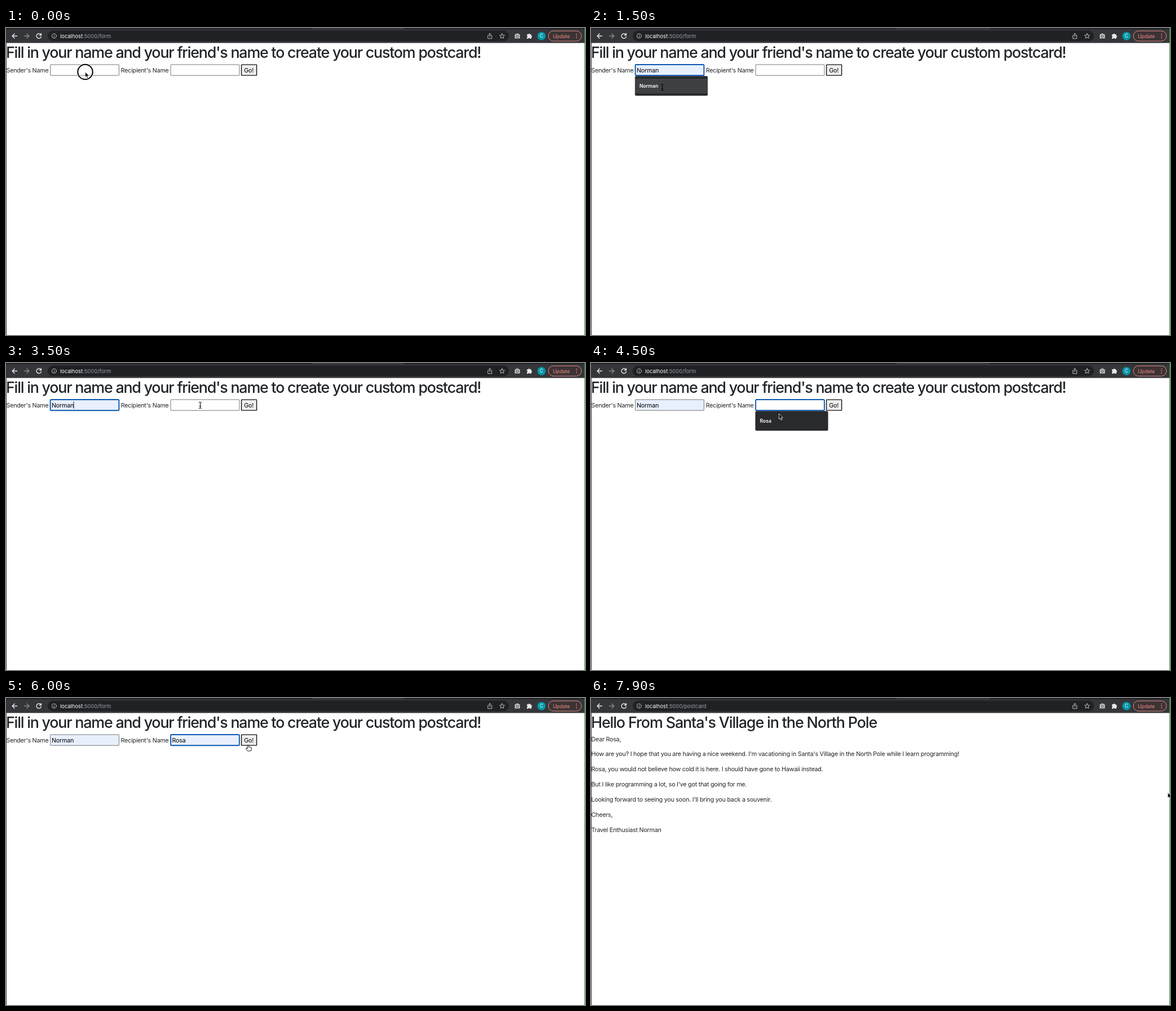
These frames come from a looping animation (1027x545 px, 8000 ms). An HTML page:

```html
<!DOCTYPE html>
<html lang="en">
<head>
<meta charset="utf-8">
<title>Postcard form</title>
<style>
  html, body { margin: 0; width: 100%; height: 100%; overflow: hidden; background: #fff; }
  svg { display: block; width: 1027px; height: 545px; }
  text { font-family: Inter, Roboto, sans-serif; font-optical-sizing: none; white-space: pre; }
  .body text { font-size: 10.75px; letter-spacing: -.25px; fill: #212529; }
  .body .title { font-size: 26.9px; font-weight: 500; letter-spacing: -1.24px; }
  .body .greeting { letter-spacing: -1.13px; }
  .body .value { fill: #000; }
  .body .option { font-size: 8.6px; font-weight: 600; letter-spacing: 0; fill: #fff; }
  .url { font-size: 9.4px; fill: #9aa0a6; }
  .url .host { fill: #fff; }
  .line { fill: none; stroke-linecap: round; stroke-linejoin: round; }
</style>
</head>
<body>
<svg viewBox="0 0 1027 545">
  <rect width="1027" height="545" fill="#fff"/>

  <g class="body" id="form">
    <text class="title" x="0" y="53">Fill in your name and your friend's name to create your custom postcard!</text>
    <text x=".5" y="78.6">Sender's Name</text>
    <text x="203.8" y="78.6">Recipient's Name</text>
    <rect id="button" x="417.6" y="65.1" width="27" height="19" fill="#efefef"/>
    <text class="value" x="422.3" y="78.6">Go!</text>
    <g id="fields"></g>
  </g>

  <g class="body" id="letter">
    <text class="title greeting" x="0" y="53">Hello From Santa's Village in the North Pole</text>
  </g>

  <g id="toolbar">
    <rect width="1027" height="26.6" fill="#35363a"/>
    <rect width="1027" height="2" fill="#202124"/>
    <rect x="542" width="165" height="2" fill="#35363a"/>
    <rect x="74" y="4.6" width="818" height="19" rx="9.5" fill="#202124"/>
    <g class="line" stroke="#e8eaed" stroke-width="1.4">
      <path d="M19.5 14.2h-8.4m4-4-4 4 4 4"/>
      <path d="M32.5 14.2h8.4m-4-4 4 4-4 4" stroke="#85878b"/>
      <path id="reload" d="M61.6 11.5A4.2 4.2 0 1 0 62.4 15.4M62.4 9.8v2.9h-2.9"/>
      <path id="stop" d="m55 10.8 6.8 6.8m0-6.8-6.8 6.8"/>
    </g>
    <g class="line" stroke="#bdc1c6" stroke-width="1">
      <circle cx="85.4" cy="14.2" r="4"/>
      <path d="M85.4 13.8v2.4m0-4.2v.1"/>
      <path d="M856.3 13.2h-1.6v5.6h7v-5.6h-1.6m-1.9 2.3V9.6m-1.9 1.9 1.9-1.9 1.9 1.9"/>
      <path d="m880 9.8 1.3 2.9 3.1.3-2.3 2.1.7 3.1-2.8-1.6-2.8 1.6.7-3.1-2.3-2.1 3.1-.3z"/>
    </g>
    <text class="url" x="96" y="17.6"><tspan class="host">localhost</tspan><tspan id="path"></tspan></text>
    <path d="M902.5 11.2h2l1-1.5h3l1 1.5h2v7.4h-9z" fill="#c9cbce"/>
    <circle cx="907" cy="14.7" r="2.1" fill="#c9cbce" stroke="#35363a" stroke-width="1"/>
    <path d="M924 11.3h2.5a1.4 1.4 0 1 1 2.8 0h2.4v2.4a1.4 1.4 0 1 1 0 2.8v2.4h-2.5a1.4 1.4 0 0 0-2.7 0H924v-2.5a1.4 1.4 0 0 0 0-2.7z" fill="#e8eaed"/>
    <circle cx="949.8" cy="14.3" r="7.4" fill="#0097a7"/>
    <text x="949.8" y="17.3" font-size="8.4" text-anchor="middle" fill="#fff">C</text>
    <rect x="962" y="5.2" width="58.6" height="18" rx="9" fill="#3c3335" stroke="#e58a83"/>
    <text x="970" y="17.5" font-size="8.8" fill="#f28b82">Update</text>
    <path class="line" d="M1012 10.7v.01m0 3.5v.01m0 3.5v.01" stroke="#f28b82" stroke-width="1.7"/>
  </g>

  <rect y="26.6" width="1" height="519" fill="#3a3a3c"/>
  <rect x="1026" width="1" height="545" fill="#2f9e38"/>

  <g id="pointer">
    <g class="line" id="ring">
      <circle stroke="#fff" stroke-width="4"/>
      <circle stroke="#000" stroke-width="2"/>
    </g>
    <path id="arrow" d="M0 0v9.6l2.2-2 1.6 3.7 1.7-.8-1.6-3.5h3z" fill="#000" stroke="#fff" stroke-width=".8"/>
    <path id="beam" class="line" d="M-2.2-5.7Q0-5.7 0-4.2V4.2Q0 5.7-2.2 5.7M2.2-5.7Q0-5.7 0-4.2V4.2Q0 5.7 2.2 5.7M-1.2 1.8h2.4" stroke="#000"/>
    <path id="hand" d="M-1 .7Q0-.7 1 .7v3.5q1-.8 1.8.2 1-.7 1.7.3 1.3-.5 1.5.8v2.4L4.8 11H-1L-3.7 7.3q-.5-1.8.8-1.6l1.9 1.2z" fill="#fff" stroke="#000" stroke-width=".9" stroke-linejoin="round"/>
  </g>
</svg>
<script>
const DURATION = 8000, STEP = 100, BLUE = '#0b57b0';
const el = id => document.getElementById(id);
const show = (node, on) => { node.style.display = on ? '' : 'none'; };
const within = (t, spans) => spans.some(([from, to]) => t >= from && t < to);

const paragraphs = [
  'Dear Rosa,',
  "How are you? I hope that you are having a nice weekend. I'm vacationing in Santa's Village in the North Pole while I learn programming!",
  'Rosa, you would not believe how cold it is here. I should have gone to Hawaii instead.',
  "But I like programming a lot, so I've got that going for me.",
  "Looking forward to seeing you soon. I'll bring you back a souvenir.",
  'Cheers,',
  'Travel Enthusiast Norman'
];
el('letter').insertAdjacentHTML('beforeend', paragraphs.map((line, i) =>
  `<text x=".5" y="${76.6 + 26.85 * i}">${line}</text>`).join(''));

// Times in ms: menu opens, option is hovered, value is filled, focus is lost.
const fields = [
  { x: 78, name: 'Norman', open: 800, hover: 1500, fill: 2300, blur: 3900,
    blinks: [[800, 1300], [1700, 1900], [2300, 2700], [3200, 3900]] },
  { x: 291.5, name: 'Rosa', open: 3900, hover: 4700, fill: 5300, blur: 6800,
    blinks: [[3900, 4500], [5300, 5600], [6300, 6500]] }
];
for (const field of fields) {
  const { x, name } = field;
  el('fields').insertAdjacentHTML('beforeend', `<g>
    <rect class="box" x="${x + .6}" y="65" width="121.8" height="19.2"/>
    <text class="value" x="${x + 3}" y="78.6">${name}</text>
    <rect class="caret" y="68.5" width="1" height="12.5" fill="#222"/>
    <g class="menu">
      <rect x="${x - .4}" y="85.4" width="129.8" height="35.8" rx="3" fill="#000" opacity=".18"/>
      <rect x="${x}" y="85.2" width="129" height="34.8" rx="2.5" fill="#292a2d"/>
      <rect class="row" x="${x}" y="90" width="129" height="26" fill="#3f4043"/>
      <text class="option" x="${x + 8}" y="106.1">${name}</text>
    </g></g>`);
  const group = el('fields').lastElementChild;
  field.parts = Object.fromEntries(['box', 'value', 'caret', 'menu', 'row']
    .map(part => [part, group.querySelector('.' + part)]));
}

// Pointer stops: time, x, y, shape.
const stops = [
  [0, 140.5, 78, 'arrow'], [400, 140.5, 78, 'arrow'], [700, 132, 76, 'beam'],
  [1200, 132, 76, 'beam'], [1500, 126.5, 105.5, 'beam'], [2600, 126.5, 105.5, 'beam'],
  [2700, 130, 104, 'arrow'], [3500, 344.5, 75, 'beam'], [4400, 344.5, 75, 'beam'],
  [4500, 333.5, 90, 'arrow'], [4700, 318, 106, 'arrow'], [5500, 318, 106, 'arrow'],
  [6000, 429.5, 83, 'hand'], [6500, 433, 76, 'hand'], [7200, 433, 76, 'hand'],
  [7300, 433, 75.5, 'arrow'], [7500, 433, 75.5, 'arrow'], [7900, 1023, 168, 'arrow']
];
const clicks = [-100, 800, 1900, 3900, 4900, 6800];

function pointerAt(t) {
  let i = stops.length - 1;
  while (stops[i][0] > t) i--;
  const [t0, x0, y0, shape] = stops[i];
  const [t1, x1, y1] = stops[i + 1] || [DURATION, x0, y0];
  const p = (t - t0) / (t1 - t0), k = p * p * (3 - 2 * p);
  return { x: x0 + (x1 - x0) * k, y: y0 + (y1 - y0) * k, shape };
}

function drawOutline(box, focused, color, width) {
  box.setAttribute('stroke', focused ? BLUE : color);
  box.setAttribute('stroke-width', focused ? 1.9 : width);
  box.setAttribute('rx', focused ? 1.6 : .6);
}

function drawField({ x, open, hover, fill, blur, blinks, parts }, t) {
  const hasValue = t >= hover;
  drawOutline(parts.box, t >= open && t < blur, '#767676', 1);
  parts.box.setAttribute('fill', hasValue ? '#e8f0fe' : '#fff');
  show(parts.value, hasValue);
  show(parts.menu, t >= open && t < fill);
  show(parts.row, hasValue);
  show(parts.caret, within(t, blinks));
  const typed = t >= fill ? parts.value.getComputedTextLength() : 0;
  parts.caret.setAttribute('x', x + 2.5 + typed);
}

function drawPointer(t) {
  const { x, y, shape } = pointerAt(t);
  el('pointer').setAttribute('transform', `translate(${x} ${y})`);
  for (const id of ['arrow', 'beam', 'hand']) show(el(id), id === shape);
  const click = clicks.find(c => t >= c && t < c + 200);
  show(el('ring'), click !== undefined);
  const radius = t - click < 100 ? 10 : 13.2;
  for (const circle of el('ring').children) circle.setAttribute('r', radius);
}

function draw(t) {
  const arrived = t >= 7400, loading = t >= 7300 && !arrived;
  show(el('form'), !arrived);
  show(el('letter'), arrived);
  show(el('stop'), loading);
  show(el('reload'), !loading);
  el('path').textContent = t >= 7300 ? ':5000/postcard' : ':5000/form';
  drawOutline(el('button'), t >= 6800, '#111', 1.4);
  if (!arrived) fields.forEach(field => drawField(field, t));
  drawPointer(t);
}

const start = performance.now();
let shown = -1;
function tick() {
  const t = Math.floor((performance.now() - start) % DURATION / STEP) * STEP;
  if (t !== shown) draw(shown = t);
  requestAnimationFrame(tick);
}
tick();
</script>
</body>
</html>
```
